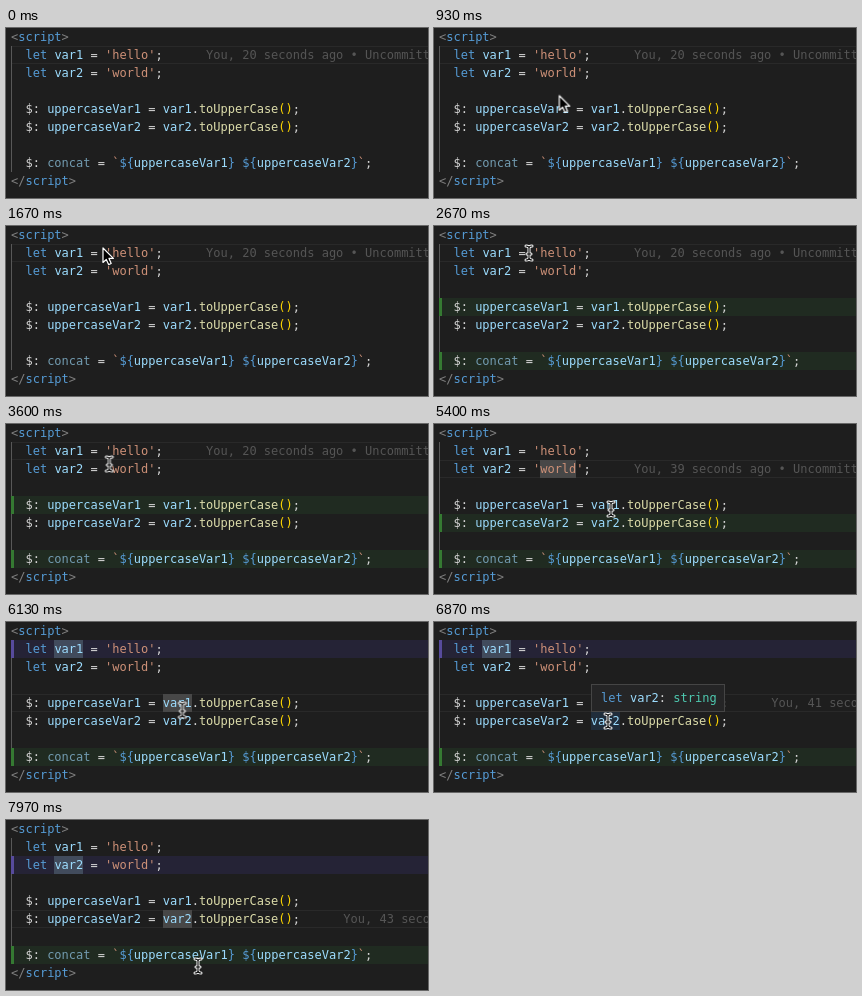
An HTML page that plays this animation: 422 px wide and 170 px high, repeating every 8 s.

```html
<!DOCTYPE html>
<html lang="en">
<head>
<meta charset="utf-8">
<title>Reactive code highlighting</title>
<style>
  html, body { margin: 0; width: 100%; height: 100%; overflow: hidden; background: #1e1e1e; }
  #stage { position: relative; width: 422px; height: 170px; overflow: hidden; background: #1e1e1e; }
  #stage, pre { font: 12px/18px "DejaVu Sans Mono", monospace; color: #d4d4d4; white-space: pre; }
  #stage > * { position: absolute; }
  pre { left: 5px; top: 0; margin: 0; }

  /* --row is the line number, --col the character column */
  .row, .word, .blame { top: calc(var(--row) * 18px); height: 18px; }
  .row { left: 5px; right: 0; box-sizing: border-box; }
  .current { border: solid #292929; border-width: 1px 0; }
  .green { background: #202b21; border-left: 3px solid #357a32; }
  .purple { background: #252336; border-left: 3px solid #574b9c; }
  .word { left: calc(5px + var(--col) * 1ch); width: calc(var(--len, 4) * 1ch); background: #474747; }
  .write { background: #414b5c; }
  .hover { background: #202d3b; }
  .blame { left: calc(5px + var(--col) * 1ch); color: #555; }
  .guide { left: 5px; top: 18px; width: 1px; height: 126px; background: #585858; }
  .tip { left: 157px; top: 62px; width: 134px; height: 28px; box-sizing: border-box;
         padding: 4px 9px; background: #252526; border: 1px solid #454545; }

  .tag { color: #808080; }
  .key { color: #569cd6; }
  .var { color: #9cdcfe; }
  .str { color: #ce9178; }
  .fn { color: #dcdcaa; }
  .par { color: #ffd700; }
  .type { color: #4ec9b0; }
  .unused { color: #729bb0; }

  .on { animation: var(--when) 8s step-end infinite; }
  @keyframes first { 46.25% { opacity: 0 } }
  @keyframes second { 0% { opacity: 0 } 46.25% { opacity: 1 } 72.5% { opacity: 0 } }
  @keyframes third { 0% { opacity: 0 } 72.5% { opacity: 1 } 88.75% { opacity: 0 } }
  @keyframes fourth { 0% { opacity: 0 } 88.75% { opacity: 1 } }
  @keyframes firstDeps { 0% { opacity: 0 } 23.75% { opacity: 1 } 46.25% { opacity: 0 } }
  @keyframes concatDeps { 0% { opacity: 0 } 23.75% { opacity: 1 } }
  @keyframes secondLate { 0% { opacity: 0 } 51.25% { opacity: 1 } 72.5% { opacity: 0 } }
  @keyframes thirdLate { 0% { opacity: 0 } 77.5% { opacity: 1 } 88.75% { opacity: 0 } }
  @keyframes fourthLate { 0% { opacity: 0 } 93% { opacity: 1 } }
  @keyframes hint { 0% { opacity: 0 } 82.5% { opacity: 1 } 88.75% { opacity: 0 } }
  @keyframes arrow { 21.2% { opacity: 0 } }
  @keyframes beam { 0% { opacity: 0 } 21.2% { opacity: 1 } }

  .pointer { left: 0; top: 0; overflow: visible; animation: travel 8s ease-in-out infinite; }
  @keyframes travel {
    0% { transform: translate(165px, 172px) }
    10% { transform: translate(128px, 72px) }
    18%, 21% { transform: translate(97px, 22px) }
    24%, 41% { transform: translate(95px, 27px) }
    46%, 59% { transform: translate(104px, 41px) }
    66.5%, 75% { transform: translate(177px, 85px) }
    80%, 92% { transform: translate(174px, 99px) }
    99%, 100% { transform: translate(192px, 146px) }
  }
</style>
</head>
<body>
<div id="stage">
  <div class="row current on" style="--row:1;--when:first"></div>
  <div class="row current on" style="--row:2;--when:second"></div>
  <div class="row current on" style="--row:4;--when:third"></div>
  <div class="row current on" style="--row:5;--when:fourth"></div>
  <div class="guide"></div>

  <div class="row green on" style="--row:4;--when:firstDeps"></div>
  <div class="row green on" style="--row:5;--when:second"></div>
  <div class="row green on" style="--row:7;--when:concatDeps"></div>
  <div class="row purple on" style="--row:1;--when:third"></div>
  <div class="row purple on" style="--row:2;--when:fourth"></div>

  <div class="word on" style="--row:2;--col:14;--len:5;--when:second"></div>
  <div class="word write on" style="--row:1;--col:6;--when:third"></div>
  <div class="word on" style="--row:4;--col:21;--when:third"></div>
  <div class="word write on" style="--row:2;--col:6;--when:fourth"></div>
  <div class="word on" style="--row:5;--col:21;--when:fourth"></div>
  <div class="word hover on" style="--row:5;--col:21;--when:hint"></div>

  <div class="blame on" style="--row:1;--col:27;--when:first">You, 20 seconds ago • Uncommitted changes</div>
  <div class="blame on" style="--row:2;--col:27;--when:secondLate">You, 39 seconds ago • Uncommitted changes</div>
  <div class="blame on" style="--row:4;--col:46;--when:thirdLate">You, 41 seconds ago • Uncommitted changes</div>
  <div class="blame on" style="--row:5;--col:46;--when:fourthLate">You, 43 seconds ago • Uncommitted changes</div>

<pre><span class="tag">&lt;<span class="key">script</span>&gt;</span>
  <span class="key">let</span> <span class="var">var1</span> = <span class="str">'hello'</span>;
  <span class="key">let</span> <span class="var">var2</span> = <span class="str">'world'</span>;

  $: <span class="var">uppercaseVar1</span> = <span class="var">var1</span>.<span class="fn">toUpperCase</span><span class="par">()</span>;
  $: <span class="var">uppercaseVar2</span> = <span class="var">var2</span>.<span class="fn">toUpperCase</span><span class="par">()</span>;

  $: <span class="unused">concat</span> = <span class="str">`<span class="key">${</span><span class="var">uppercaseVar1</span><span class="key">}</span> <span class="key">${</span><span class="var">uppercaseVar2</span><span class="key">}</span>`</span>;
<span class="tag">&lt;/<span class="key">script</span>&gt;</span></pre>

  <div class="tip on" style="--when:hint"><span class="key">let</span> <span class="var">var2</span>: <span class="type">string</span></div>

  <svg class="pointer" width="1" height="1">
    <path class="on" style="--when:arrow" d="M0 0V14.5L3.3 11.4L5.6 16.6L8.2 15.5L6 10.4H10.4Z"
          fill="#000" stroke="#fff" stroke-width="1.2" stroke-linejoin="round"/>
    <g class="on" style="--when:beam" fill="none" stroke-linecap="round">
      <path id="ibeam" d="M-3 -7Q0 -7 0 -5Q0 -7 3 -7M0 -5V5M-3 7Q0 7 0 5Q0 7 3 7M-2 1H2" stroke="#fff" stroke-width="3"/>
      <use href="#ibeam" style="display:none"/>
      <path d="M-3 -7Q0 -7 0 -5Q0 -7 3 -7M0 -5V5M-3 7Q0 7 0 5Q0 7 3 7M-2 1H2" stroke="#000" stroke-width="1.1"/>
    </g>
  </svg>
</div>
</body>
</html>
```
